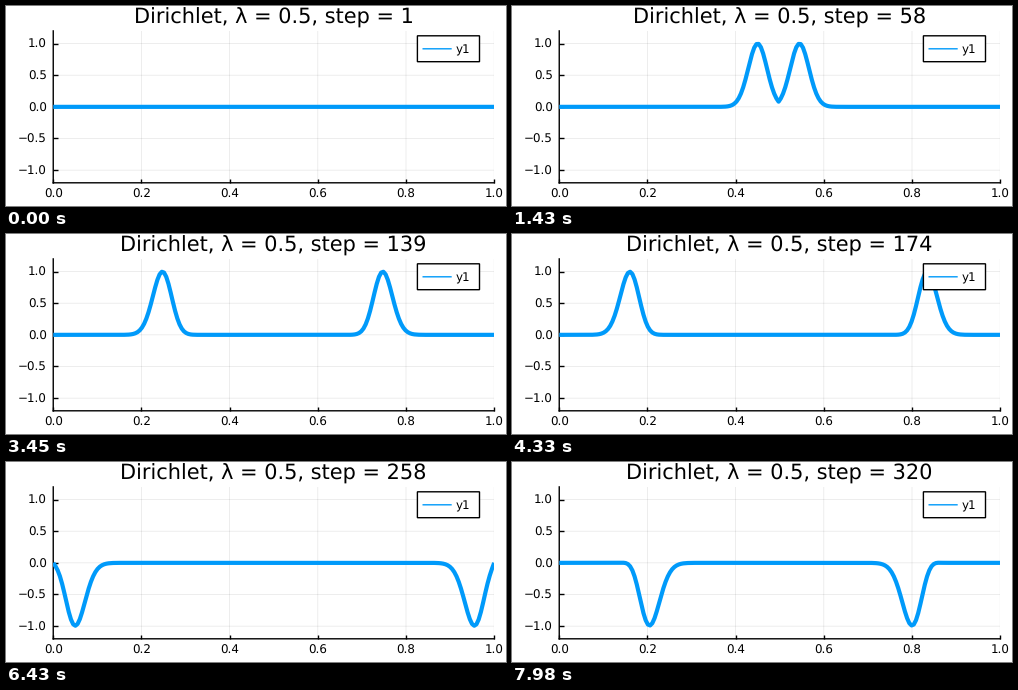
Recreate the animation shown at these times as a matplotlib script. Size 500x200 px, loop 8000 ms.

```python
import numpy as np
import matplotlib.pyplot as plt
from matplotlib.animation import FuncAnimation
from matplotlib.lines import Line2D
from matplotlib.patches import Rectangle
from matplotlib.spines import Spine

W, H, DPI = 500, 200, 100
PX = 72 / DPI                      # one pixel in points
STEPS, INTERVAL = 320, 25
CELLS, LAM = 200, 0.5
MID, PEAK, SPREAD = 99, 39, 12     # driven node, pulse time and width in steps
BLUE = "#009afa"
LEFT, RIGHT, TOP, BOTTOM = 47.24, 488.19, 24.9, 176.8
SMALL, LARGE = 8.57, 15            # text sizes in points

plt.rcParams.update({"font.family": "DejaVu Sans", "text.hinting": "none"})


def solve():
    """Leapfrog wave equation, fixed ends, Gaussian drive at the middle node."""
    prev = np.zeros(CELLS)
    cur = np.zeros(CELLS)
    states = [cur]
    for n in range(2, STEPS + 1):
        new = np.zeros(CELLS)
        lap = cur[2:] - 2 * cur[1:-1] + cur[:-2]
        new[1:-1] = 2 * cur[1:-1] - prev[1:-1] + LAM**2 * lap
        new[MID] = np.exp(-((n - PEAK) / SPREAD) ** 2)
        prev, cur = cur, new
        states.append(cur)
    return states


waves = solve()
x = np.linspace(0, 1, CELLS)

fig = plt.figure(figsize=(W / DPI, H / DPI), dpi=DPI, facecolor="white")
ax = fig.add_axes([LEFT / W, 1 - BOTTOM / H, (RIGHT - LEFT) / W, (BOTTOM - TOP) / H])
ax.set(xlim=(0, 1), ylim=(-1.2, 1.2))
ax.patch.set_visible(False)
ax.spines[["top", "right"]].set_visible(False)
ax.spines[["left", "bottom"]].set_linewidth(1)
ax.set_xticks(np.arange(6) / 5)
ax.set_yticks(np.arange(-2, 3) / 2)
ax.xaxis.set_major_formatter("{x:.1f}")
ax.yaxis.set_major_formatter("{x:.1f}")
ax.tick_params(direction="in", length=4.5 * PX, width=1, labelsize=SMALL)
ax.tick_params(axis="x", pad=5.5 * PX)
ax.tick_params(axis="y", pad=6.5 * PX)
ax.grid(color="black", alpha=0.1, linewidth=0.5)
ax.set_axisbelow(True)

curve, = ax.plot(x, waves[0], color=BLUE, lw=3, zorder=3,
                 solid_joinstyle="round", solid_capstyle="butt")

# Overlay in pixel coordinates, y downwards
top = fig.add_axes([0, 0, 1, 1], zorder=5)
top.set(xlim=(0, W), ylim=(H, 0))
top.axis("off")
top.add_patch(Rectangle((411.4, 29.8), 62.1, 25.9, fc="white", ec="black", lw=1))
top.add_line(Line2D([416.5, 445.7], [42.8, 42.8], color=BLUE, lw=1,
                    solid_capstyle="butt"))
top.text(450, 47.5, "y1", size=SMALL, va="baseline")
title = top.text((LEFT + RIGHT) / 2, 18, "", size=LARGE,
                 ha="center", va="baseline")

# Keep sub-pixel positions of all straight strokes
for kind in (Line2D, Spine, Rectangle):
    for artist in fig.findobj(kind):
        artist.set_snap(False)


def draw(i):
    curve.set_ydata(waves[i])
    title.set_text(f"Dirichlet, λ = {LAM}, step = {i + 1}")
    return curve, title


anim = FuncAnimation(fig, draw, frames=STEPS, interval=INTERVAL,
                     init_func=lambda: draw(0), repeat=True, repeat_delay=0)
plt.show()
```
